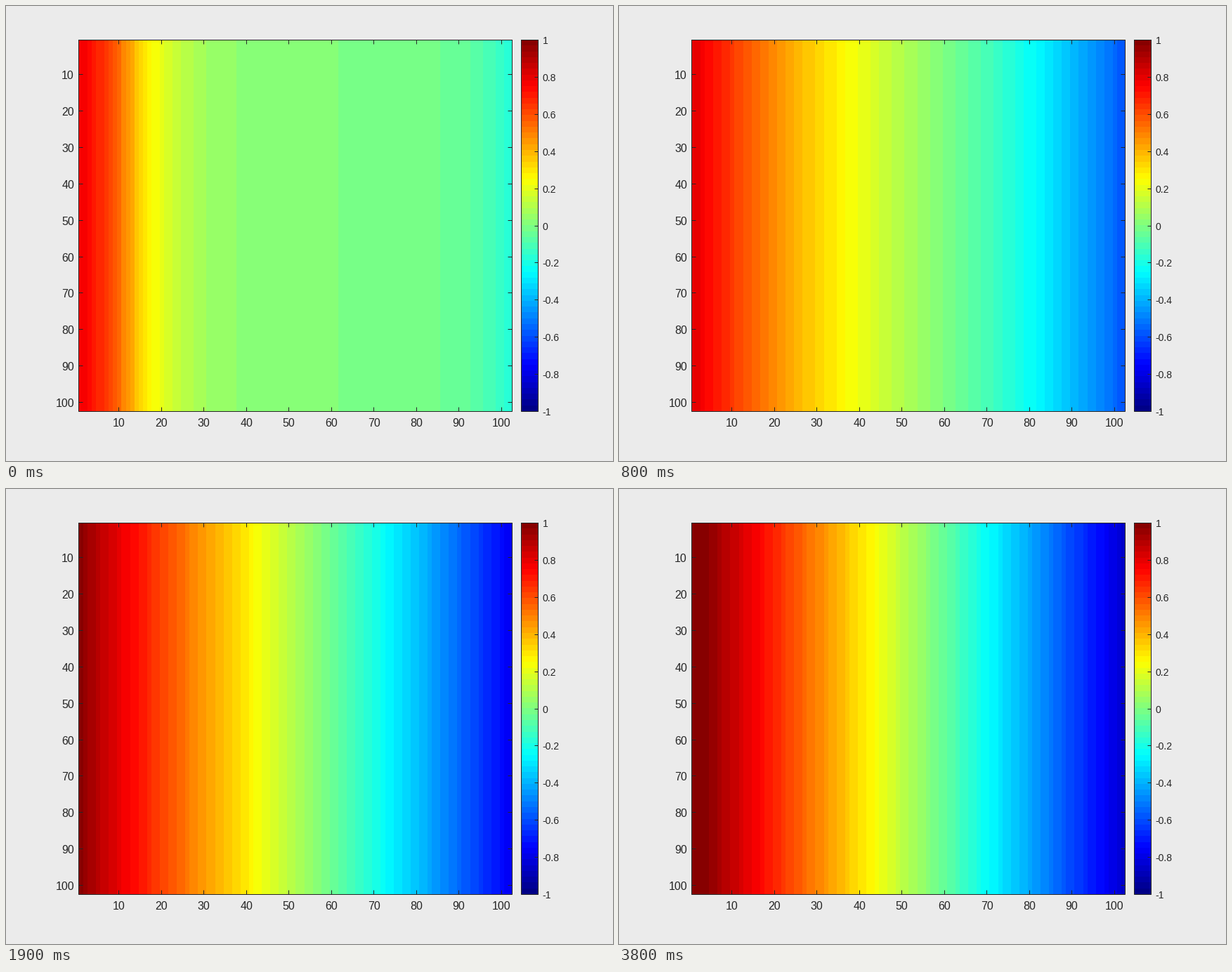
Animation of 864 by 648 pixels, one loop 4000 ms. Source, as a matplotlib script:

```python
import numpy as np
import matplotlib.pyplot as plt
from matplotlib.animation import FuncAnimation

W, H = 864, 648
CELLS, LEVELS, FRAMES = 102, 64, 40
LEFT, RIGHT, TOP, BOTTOM = 103.5, 720.5, 48.5, 577.5
BAR_L, BAR_R = 733.5, 757.5
INK = "#262626"

# heat equation: equal inflow at the left and outflow at the right
DIFFUSION = 90.0
FLUX = 0.0197
HOT_CELLS, HOT = 12, 0.83


def jet(level):
    x = (np.asarray(level) + 0.5) / LEVELS
    rgb = [1.5 - np.abs(4 * x - c) for c in (3, 2, 1)]
    return np.clip(np.stack(rgb, axis=-1), 0, 1)


def shade(u):
    return jet(np.clip(np.floor((u + 1) / 2 * LEVELS), 0, LEVELS - 1))


def solve():
    """One implicit step per frame; the steps fade out near the steady state."""
    lap = 2 * np.eye(CELLS) - np.eye(CELLS, k=1) - np.eye(CELLS, k=-1)
    lap[0, 0] = lap[-1, -1] = 1
    source = np.zeros(CELLS)
    source[0], source[-1] = FLUX, -FLUX
    u = np.where(np.arange(CELLS) < HOT_CELLS, HOT, 0.0)
    states = []
    for n in range(FRAMES):
        d = DIFFUSION / (1 + np.exp((n - 30) / 2))
        u = np.linalg.solve(np.eye(CELLS) + d * lap, u + d * source)
        states.append(u)
    return states


states = solve()

plt.rcParams["font.family"] = "Liberation Sans"
fig = plt.figure(figsize=(W / 72, H / 72), dpi=72, facecolor="#EBEBEB")
ax = fig.add_axes([0, 0, 1, 1])
ax.axis("off")


def line(xs, ys):
    ax.plot(xs, ys, color=INK, lw=1, solid_capstyle="butt",
            solid_joinstyle="miter", snap=False, zorder=3)


def frame(l, r):
    line([l, r, r, l, l, r], [TOP, TOP, BOTTOM, BOTTOM, TOP, TOP])


def label(x, y, text, size, align):
    ax.text(x, y + 0.36 * size, text, size=size, color=INK, ha=align, va="baseline")


def image(rgb, l, r):
    return ax.imshow(rgb, extent=(l, r, BOTTOM, TOP),
                     interpolation="nearest", aspect="auto", zorder=1)


field = image(shade(states[0])[None], LEFT, RIGHT)
image(jet(np.arange(LEVELS))[::-1, None], BAR_L, BAR_R)
ax.set_xlim(0, W)
ax.set_ylim(H, 0)

frame(LEFT, RIGHT)
frame(BAR_L, BAR_R)

for v in range(10, 101, 10):
    part = (v - 0.5) / CELLS
    x = np.floor(LEFT + part * (RIGHT - LEFT)) + 0.5
    y = np.floor(TOP + part * (BOTTOM - TOP)) + 0.5
    line([x, x], [TOP, TOP + 6])
    line([x, x], [BOTTOM, BOTTOM - 6])
    line([LEFT, LEFT + 6], [y, y])
    line([RIGHT, RIGHT - 6], [y, y])
    label(x, 593.3, str(v), 16, "center")
    label(97, y + 0.5, str(v), 16, "right")

for k in range(-5, 6):
    y = np.floor(TOP + (5 - k) / 10 * (BOTTOM - TOP)) + 0.5
    line([BAR_R - 5, BAR_R], [y, y])
    label(763.5, y + 0.3, f"{k / 5:g}", 14, "left")


def update(n):
    field.set_data(shade(states[n])[None])
    return [field]


anim = FuncAnimation(fig, update, frames=FRAMES, interval=100, repeat=True)
plt.show()
```
